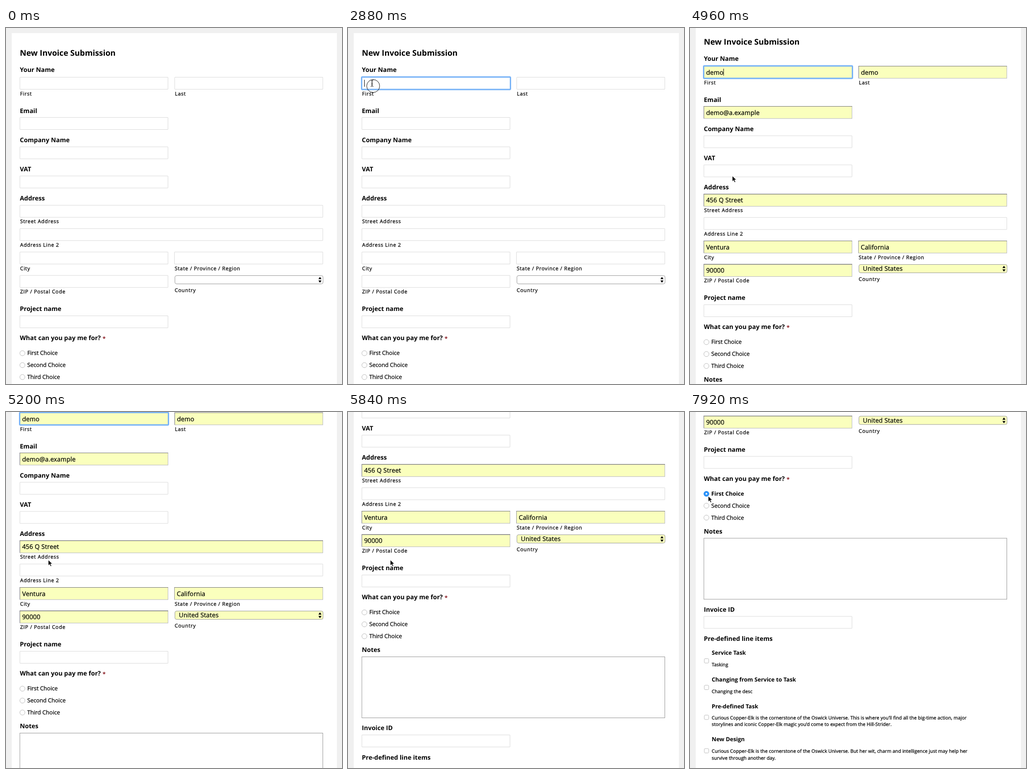
Animation, 727 px wide and 770 px high, one loop 8000 ms. Source, as an HTML page:

```html
<!DOCTYPE html>
<html lang="en">
<head>
<meta charset="utf-8">
<title>Invoice form</title>
<style>
  html, body { margin: 0; width: 100%; height: 100%; overflow: hidden; background: #f0f0f0; }
  svg { display: block; }
  text { font-family: "Open Sans", "Noto Sans", sans-serif; fill: #000; stroke: #000; stroke-width: .28px; white-space: pre; text-rendering: geometricPrecision; }
  .title { font-size: 17.2px; font-weight: 700; stroke: none; }
  .label { font-size: 13.5px; font-weight: 700; stroke: none; letter-spacing: .04px; }
  .sub { font-size: 11px; letter-spacing: .7px; }
  .value { font-size: 13.6px; letter-spacing: .1px; }
  .choice { font-size: 12.2px; }
  .choice.on { font-weight: 700; stroke: none; }
  .item { font-size: 12.2px; font-weight: 700; stroke: none; }
  .desc { font-size: 10.2px; letter-spacing: .06px; }
  .star { font-size: 12px; font-weight: 700; fill: #8a1c24; stroke: none; }
  .menu { font: 10.6px Inter, "Liberation Sans", sans-serif; stroke: none; }
  .menu.bold { font-weight: 700; }
  .menu.hint { fill: #808080; text-anchor: end; }
</style>
</head>
<body>
<svg id="stage" width="727" height="770" viewBox="0 0 727 770">
  <g id="page">
    <rect x="12.5" y="11" width="703.5" height="2000" fill="#fff"/>
    <g id="form"></g>
    <g id="filled"></g>
    <rect id="ring" x="29.5" y="106" width="322" height="27" rx="1.5" fill="none" stroke="#76b2f7" stroke-width="2.8"/>
    <g id="popup"></g>
    <path id="caret" stroke="#000"/>
  </g>
  <circle id="click" r="14" fill="none" stroke="#111"/>
  <g id="cursor">
    <path id="arrow" d="M0 0V12L2.9 9.4 4.9 13.9 7 13 5 8.6H8.8Z" fill="#000" stroke="#fff" stroke-width=".8"/>
    <path id="beam" d="M-3 -7Q0 -7 0 -5V5Q0 7 -3 7M3 -7Q0 -7 0 -5V5Q0 7 3 7M-1.5 1.5H1.5" fill="none" stroke="#222"/>
    <path id="hand" d="M-2 -6Q-.5 -7.5 .5 -5.5L1.2 -2Q2.5 -3 3.5 -1.6 5 -2.2 5.6 -.8 7.4 -.8 7.4 1.5L6.6 5V7.5H.2L-4.2 2.4Q-4.2 .4 -2 1.4L-1 2.2Z" fill="#fff" stroke="#333"/>
  </g>
</svg>
<script>
const LOOP = 8000, STEP = 80, YELLOW = "#faffbd";
const $ = id => document.getElementById(id);

function add(parent, tag, attrs, content) {
  const el = document.createElementNS("http://www.w3.org/2000/svg", tag);
  for (const k in attrs) el.setAttribute(k, attrs[k]);
  if (content) el.textContent = content;
  parent.append(el);
  return el;
}
const form = $("form"), filled = $("filled"), popup = $("popup");
const text = (parent, cls, x, y, str) => add(parent, "text", { class: cls, x, y }, str);
const box = (parent, x, y, width, height, fill, stroke, rx = 0) =>
  add(parent, "rect", { x, y, width, height, fill, stroke, rx });

// An input with an optional autofilled value and a caption under it
function field(x, y, w, caption, value) {
  box(form, x, y, w, 26, "#fff", "#dadada", .5);
  if (caption) text(form, "sub", x + .5, y + 39, caption);
  if (!value) return;
  box(filled, x, y, w, 26.3, YELLOW, "#b8b8c0");
  add(filled, "path", { d: `M${x} ${y + 26}V${y}`, stroke: "#94949a" });
  add(filled, "path", { d: `M${x - .5} ${y}h${w + 1}`, stroke: "#747474", "stroke-width": 1.2 });
  text(filled, "value", x + 5, y + 18, value);
}

text(form, "title", 30, 60, "New Invoice Submission");
[
  [94.8, "Your Name"], [183.6, "Email"], [246.8, "Company Name"], [310, "VAT"],
  [373, "Address"], [612.2, "Project name"], [675.4, "What can you pay me for?"],
  [789.4, "Notes"], [958.4, "Invoice ID"], [1021.6, "Pre-defined line items"]
].forEach(([y, s]) => text(form, "label", 30, y, s));
text(form, "star", 209, 676, "*");

const HALF = 320.5, FULL = 655.5, RIGHT = 365;
field(30, 106.5, HALF, "First", "demo");
field(RIGHT, 106.5, HALF, "Last", "demo");
field(30, 193.5, HALF, "", "demo@a.example");
field(30, 257, HALF);
field(30, 320, HALF);
field(30, 383.4, FULL, "Street Address", "456 Q Street");
field(30, 433.8, FULL, "Address Line 2");
field(30, 484.5, HALF, "City", "Ventura");
field(364.5, 484.5, 321, "State / Province / Region", "California");
field(30, 535.2, HALF, "ZIP / Postal Code", "90000");
field(30, 622.5, HALF);
field(30, 968.5, HALF);
box(form, 30, 799.5, FULL, 132, "#fff", "#959595");

const select = box(form, 365.5, 535.5, 320.5, 18, "#fff", "#999", 3.5);
add(form, "path", { d: "M676 543.3l3.3 -5 3.3 5zM676 546l3.3 5 3.3 -5z" });
text(form, "sub", 365, 571, "Country");
text(filled, "value", 374, 549.4, "United States");

const choices = ["First", "Second", "Third"].map((s, i) => {
  const y = 703.4 + i * 25.8;
  add(form, "circle", { cx: 35.5, cy: y, r: 5.5, fill: "#fff", stroke: "#b8b8b8" });
  return text(form, "choice", 46, y + 4, s + " Choice");
});
const dot = add(form, "g", {});
add(dot, "circle", { cx: 35.5, cy: 703.4, r: 6, fill: "#2a92fa" });
add(dot, "circle", { cx: 35.5, cy: 703.4, r: 1.9, fill: "#fff" });

[
  [1051.8, 1064.5, "Service Task", 1076.6, "Tasking"],
  [1109, 1122, "Changing from Service to Task", 1134, "Changing the desc"],
  [1167, 1186.6, "Pre-defined Task", 1191.4,
    "Curious Copper-Elk is the cornerstone of the Oswick Universe. This is where you’ll find all the big-time action, major",
    "storylines and iconic Copper-Elk magic you’d come to expect from the Hill-Strider."],
  [1238.6, 1259, "New Design", 1263.8,
    "Curious Copper-Elk is the cornerstone of the Oswick Universe. But her wit, charm and intelligence just may help her",
    "survive through another day."]
].forEach(([y, boxY, name, descY, ...lines]) => {
  text(form, "item", 47, y, name);
  box(form, 31, boxY - 4.5, 9.5, 9.5, "#fff", "#bcbcbc", 2);
  lines.forEach((s, i) => text(form, "desc", 47, descY + i * 14.3, s));
});

// Autofill menu
box(popup, 30, 133.5, HALF, 61, "#fff", "#a3c8ef");
const picked = box(popup, 30.5, 134, 319.5, 20, "#b0d5fd", "none");
add(popup, "path", { d: "M30.5 174.5H350", stroke: "#dedede" });
text(popup, "menu bold", 37.5, 148.3, "demo");
text(popup, "menu hint", 343.5, 148.3, "456 Q Street");
text(popup, "menu bold", 37.5, 168.2, "demo");
text(popup, "menu hint", 343.5, 168.2, "demo");
text(popup, "menu", 37.5, 188.7, "Quorix Autofill settings...");

// Keys are [time, ...values], linear between them
function track(keys, t) {
  const i = keys.findIndex(k => k[0] > t);
  if (i < 0) return keys.at(-1).slice(1);
  if (!i) return keys[0].slice(1);
  const a = keys[i - 1], b = keys[i], p = (t - a[0]) / (b[0] - a[0]);
  return a.slice(1).map((v, n) => v + (b[n + 1] - v) * p);
}
const scroll = [[4800, 0], [4880, 8], [4960, 24], [5200, 105], [5440, 190], [5600, 212.5],
  [5680, 214], [5840, 270], [6080, 452], [6240, 516], [6320, 526.5]];
const pointer = [[240, 322, 533], [320, 230, 360], [400, 155, 214], [480, 155, 214],
  [720, 110, 165], [960, 68, 130], [1200, 52, 119.5], [4400, 52, 119.5],
  [4560, 72, 220], [4720, 91.5, 320], [6000, 91.5, 320], [6320, 60, 208.5],
  [6560, 60, 208.5], [6720, 50, 194], [6880, 39.5, 182]];
const clicks = [[1360, 1840], [2880, 3200], [7360, 7760]];

const within = (t, a, b) => t >= a && t < b;
const show = (el, on) => el.setAttribute("visibility", on ? "visible" : "hidden");

function draw(t) {
  const [x, y] = track(pointer, t), auto = t >= 3600, chosen = t >= 7520;
  $("page").setAttribute("transform", `translate(0 ${-track(scroll, t)[0]})`);

  show($("ring"), t >= 1440);
  show(filled, auto);
  select.setAttribute("fill", auto ? YELLOW : "#fff");
  show(popup, within(t, 2960, 3840));
  show(picked, within(t, 3600, 3840));

  const blinkOff = auto ? t >= 4080 && (t - 4080) % 960 < 480 : within(t, 2080, 2560);
  show($("caret"), t >= 1440 && !blinkOff);
  // The caret follows the end of the typed value
  const caretX = auto ? 35.5 + firstValue.getComputedTextLength() : 35.5;
  $("caret").setAttribute("d", `M${caretX} 112V127`);

  show(dot, chosen);
  choices[0].classList.toggle("on", chosen);

  const beam = within(t, 1840, 4480), hand = within(t, 6240, 6720);
  $("cursor").setAttribute("transform", `translate(${x} ${y})`);
  show($("beam"), beam);
  show($("hand"), hand);
  show($("arrow"), t >= 240 && !beam && !hand);
  $("click").setAttribute("cx", x + 2.5);
  $("click").setAttribute("cy", y + 6);
  show($("click"), clicks.some(([a, b]) => within(t, a, b)));
}
const firstValue = filled.querySelector("text");

const start = performance.now();
function tick() {
  const t = (performance.now() - start) % LOOP;
  draw(Math.floor(t / STEP) * STEP);
  requestAnimationFrame(tick);
}
tick();
</script>
</body>
</html>
```
